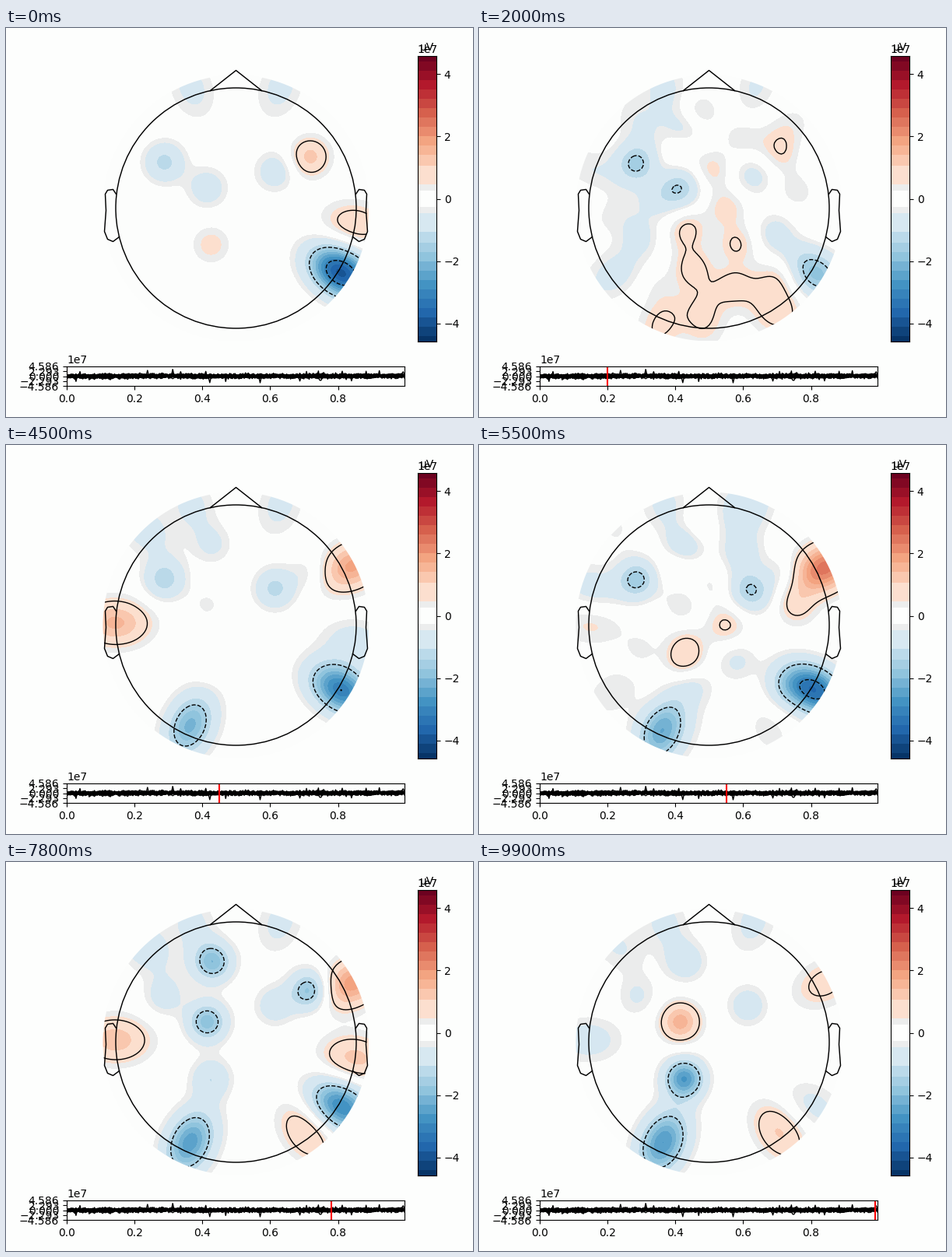
A matplotlib script that plays this animation: 600 by 500 pixels, repeating every 10 s.

```python
import numpy as np
import matplotlib.pyplot as plt
from matplotlib.animation import FuncAnimation
from matplotlib.colors import BoundaryNorm, ListedColormap
from matplotlib.patches import Circle

W, H, N = 600, 500, 100
BG = "#fdfefd"
CX, CY, R = 295, 231, 171
HEAD_R = 154.5
VMAX = 4.586

rng = np.random.default_rng(12)
xs = np.arange(CX - R, CX + R)
ys = np.arange(CY - R, CY + R)
X, Y = np.meshgrid(xs, ys)


def spread(x, y):
    """Unit bump around a sensor: round inside, stretched outward at the rim."""
    dx, dy = x - CX, y - CY
    dist = np.hypot(dx, dy) + 1e-9
    out = ((X - x) * dx + (Y - y) * dy) / dist
    side = ((Y - y) * dx - (X - x) * dy) / dist
    s_out, s_side = (31, 21) if dist > 130 else (18, 18)
    return np.exp(-0.5 * ((out / s_out) ** 2 + (side / s_side) ** 2))


# Sensor position -> potential at the key moments
moments = [0, 11, 30, 45, 66, 78, 99]
tracks = {
    (430, 314): [-3.9, 0, -4, -3.1, -3.9, -2.9, -0.6],
    (386, 347): [0, 1.2, 0, 0, 0, 1.1, 1.1],
    (444, 155): [0, -2.1, 2.2, 1.8, 1.8, 1.9, 0.8],
    (448, 252): [0.9, 1.2, -0.7, -0.7, 0.6, 1.2, 0],
    (140, 228): [0, -1.3, 2.2, 1.5, -0.7, 1.3, -0.7],
    (236, 360): [0, -0.7, 0.8, -2.1, -1.4, -2.5, -2.6],
    (177, 107): [0, 1.4, -1.4, -0.7, 0, -0.8, -0.5],
    (203, 172): [-1.2, 0, -1.7, -1.3, -1.7, -0.7, -0.5],
    (265, 128): [0, -1, -0.3, -0.5, -1.6, -1.9, -0.8],
    (258, 205): [-0.8, -1.1, -1.6, -0.3, -0.7, -1.9, 1.6],
    (263, 278): [0.6, 1.3, -1.1, 0.3, 1.2, -1, -2.6],
    (345, 184): [-0.8, 0.8, -1.5, -1.2, -0.8, -0.8, -0.8],
    (390, 165): [1.2, 1.1, -0.4, -0.5, -0.7, -2, 0],
}
maps = np.array([spread(*p) for p in tracks])
frontal = -0.6 * (spread(238, 76) + spread(352, 76))

# Restless activity at spiral sites between the key moments
SITES = 28
turn = np.arange(SITES) * 2.39996
reach = 165 * np.sqrt((np.arange(SITES) + 0.5) / SITES)
bumps = np.array([spread(CX + r * np.cos(a), CY + r * np.sin(a))
                  for r, a in zip(reach, turn)])
freq = rng.uniform(0.3, 1.3, SITES)
phase = rng.uniform(0, 2 * np.pi, SITES)


def potential(i):
    values = [np.interp(i, moments, v) for v in tracks.values()]
    u = np.interp(i, moments, range(len(moments)))
    wobble = 0.7 * abs(np.sin(np.pi * u)) * np.sin(freq * i + phase)
    return frontal + np.tensordot(values, maps, 1) + np.tensordot(wobble, bumps, 1)


# Banded colour scale with a flat centre
steps = np.r_[0.27, 0.46, 1.05, 1.4, np.arange(1.7, 4.5, 0.3), VMAX]
edges = np.r_[-steps[::-1], steps]
mids = (edges[1:] + edges[:-1]) / 2
shades = plt.get_cmap("RdBu_r")(0.5 + mids / (2 * VMAX))
shades[abs(mids) < 0.46] = (0.924, 0.928, 0.928, 1)
shades[abs(mids) < 0.1] = (0.992, 0.996, 0.992, 1)
cmap = ListedColormap(shades)
norm = BoundaryNorm(edges, cmap.N)

fig = plt.figure(figsize=(W / 100, H / 100), dpi=100, facecolor=BG)


def axes_px(x0, y0, x1, y1):
    return fig.add_axes([x0 / W, 1 - y1 / H, (x1 - x0) / W, (y1 - y0) / H],
                        facecolor=BG)


# Head
ax = axes_px(0, 0, W, H)
ax.axis("off")
im = ax.imshow(potential(0), cmap=cmap, norm=norm, interpolation="nearest",
               extent=(xs[0] - 0.5, xs[-1] + 0.5, ys[-1] + 0.5, ys[0] - 0.5),
               aspect="auto")
ax.set(xlim=(-0.5, W - 0.5), ylim=(H - 0.5, -0.5))
disc = Circle((CX, CY), R, transform=ax.transData)
im.set_clip_path(disc)

pen = dict(color="k", lw=1.05, zorder=4)
ax.add_patch(Circle((CX, CY), HEAD_R, fill=False, ec="k", lw=1.05, zorder=4))
ax.plot([262, 295, 328], [80, 54, 80], **pen)
ear_x = np.array([141, 137, 130, 127, 128, 126, 130, 137, 145])
ear_y = [213, 207, 208, 213, 234, 261, 271, 274, 268]
ax.plot(ear_x, ear_y, **pen)
ax.plot(2 * CX - ear_x, ear_y, **pen)

# Colour scale
bar = axes_px(529, 36, 553, 403)
bar.pcolormesh([0, 1], edges, mids[:, None], cmap=cmap, norm=norm)
bar.set(xticks=[], ylim=(-VMAX, VMAX), yticks=[-4, -2, 0, 2, 4])
bar.yaxis.tick_right()
fig.text(528 / W, 1 - 32.5 / H, "1e7", fontsize=10)
fig.text(541 / W, 1 - 28.5 / H, "µV", fontsize=10, ha="center")

# Traces: jitter, slow drift and a few spikes
tr = axes_px(78, 435, 512, 460)
t = np.arange(256) / 256
for _ in range(24):
    drift = np.convolve(rng.normal(0, 0.2, t.size + 8), np.ones(9) / 2, "valid")
    y = rng.normal(0, 0.38, t.size) + drift
    hits = rng.random(t.size) < 0.015
    y[hits] += rng.normal(0, 1.2, hits.sum())
    tr.plot(t, y * 1e7, "k", lw=1)
tr.set(xlim=(0, t[-1]), ylim=(-VMAX * 1e7, VMAX * 1e7),
       yticks=np.linspace(-VMAX, VMAX, 5) * 1e7)
cursor = tr.axvline(0, color="r", lw=1.5)

lines = []


def update(i):
    v = potential(i)
    im.set_data(v)
    while lines:
        lines.pop().remove()
    cs = ax.contour(xs[::3], ys[::3], v[::3, ::3], levels=[-3.1, -1.4, 0.62],
                    colors="k", linewidths=1, zorder=3)
    cs.set_clip_path(disc)
    lines.append(cs)
    cursor.set_xdata([i / 100, i / 100])
    return im, cursor


anim = FuncAnimation(fig, update, frames=N, interval=100, repeat=True,
                     repeat_delay=0, blit=False)
plt.show()
```
